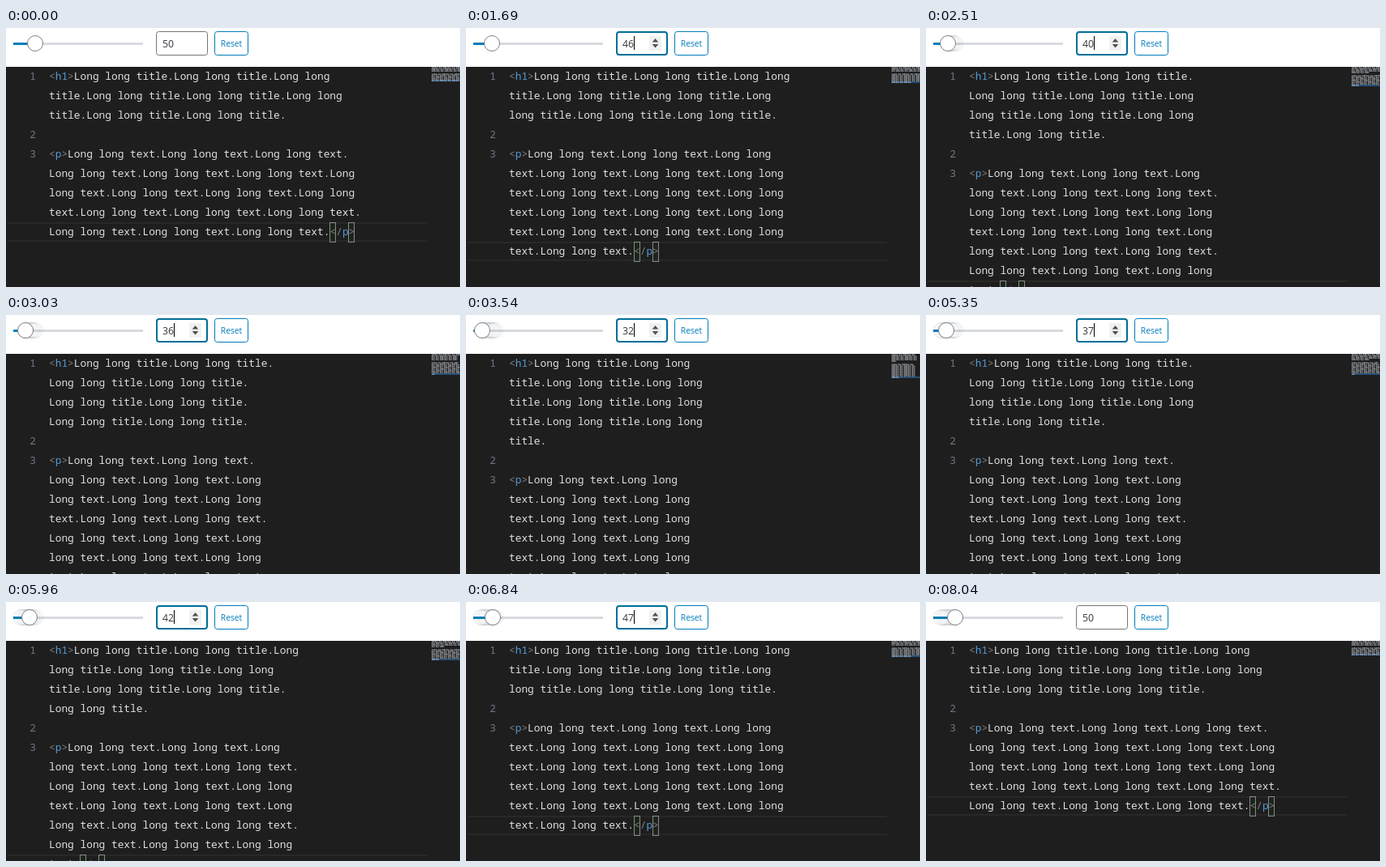
An HTML page with a canvas for the animation above (8.14 s loop, 560x320 px).

```html
<!DOCTYPE html>
<html lang="en">
<head>
<meta charset="utf-8">
<title>Word wrap slider</title>
<style>
  html, body { margin: 0; width: 100%; height: 100%; overflow: hidden; background: #1e1e1e; }
  canvas { display: block; }
</style>
</head>
<body>
<canvas id="stage" width="560" height="320"></canvas>
<script>
const ctx = document.getElementById('stage').getContext('2d');
const LOOP = 8140, MAX = 50, MIN = 30;
const HOVER = 490, FOCUS = 850, CARET_OFF = 7860, BLUR = 8040;
const LEFT = 53, TOP = 48, ROW = 24, CHAR = 7.7, MAP_X = 525;

// Moments at which the wrap column goes down, then up, by one.
const downs = [1280, 1410, 1590, 1690, 1870, 1990, 2100, 2220, 2330, 2480,
               2610, 2710, 2890, 2980, 3080, 3170, 3260, 3410, 3690, 3820];
const ups = [4330, 4500, 4670, 4840, 4990, 5220, 5340, 5470, 5590, 5710,
             5840, 5960, 6090, 6370, 6510, 6710, 6810, 6920, 7020, 7300];

const paragraphs = [
  '<h1>' + 'Long long title.'.repeat(8),
  '',
  '<p>' + 'Long long text.'.repeat(16) + '</p>'
];

const passed = (times, t) => times.filter(time => time <= t).length;

// Breaks after a space or a full stop; a trailing space counts towards the width.
function wrap(text, columns) {
  const lines = [''];
  for (const word of text.match(/[^ .]+[ .]?/g) || []) {
    const last = lines.length - 1;
    if (lines[last].length + word.length > columns) lines.push(word);
    else lines[last] += word;
  }
  return lines;
}

function rect(color, x, y, w, h) {
  ctx.fillStyle = color;
  ctx.fillRect(x, y, w, h);
}

function label(text, x, y, color, font, align = 'left') {
  ctx.fillStyle = color;
  ctx.font = font;
  ctx.textAlign = align;
  ctx.fillText(text, x, y);
}

function frame(x, y, w, h, color, width = 1) {
  ctx.strokeStyle = color;
  ctx.lineWidth = width;
  ctx.beginPath();
  ctx.roundRect(x + width / 2, y + width / 2, w - width, h - width, 3);
  ctx.stroke();
}

function triangle(x, base, tip) {
  ctx.fillStyle = '#505050';
  ctx.beginPath();
  ctx.moveTo(x - 3.8, base);
  ctx.lineTo(x + 3.8, base);
  ctx.lineTo(x, tip);
  ctx.fill();
}

function circle(x, stroke, fill) {
  ctx.beginPath();
  ctx.arc(x, 19, 9.5, 0, Math.PI * 2);
  if (fill) {
    ctx.fillStyle = fill;
    ctx.fill();
  }
  ctx.strokeStyle = stroke;
  ctx.lineWidth = 1;
  ctx.stroke();
}

const thumbX = value => Math.round(8.4 + (value - MIN) * 0.875) + 10;

function drawSlider(value, lowest, t) {
  const x = thumbX(value);
  rect('#d7dade', 9, 18, 160, 3);
  rect('#007cba', 9, 18, x - 9, 3);
  if (t >= 1870) {
    for (let v = lowest; v <= MAX; v += 2) circle(thumbX(v), 'rgba(126,137,147,.16)');
  }
  circle(x, '#7a7f84', '#fff');
}

function drawControls(value, t) {
  const sans = '"Open Sans", "Noto Sans", sans-serif';
  const focused = t >= FOCUS && t < BLUR;
  if (focused) frame(185, 4, 64, 30, '#006e98', 2);
  else frame(185, 4, 64, 30, '#757575');
  label(value, 193, 24, '#32373c', '12.3px ' + sans);
  if (focused && t < CARET_OFF) rect('#000', 207, 10, 1, 17);
  if (t >= HOVER && t < BLUR) {
    rect('#f1f1f1', 226, 10, 15, 18);
    triangle(233.5, 17.5, 13);
    triangle(233.5, 20, 24.5);
  }
  frame(257, 4, 42, 30, '#007cba');
  label('Reset', 278, 23, '#007cba', '10.3px ' + sans, 'center');
}

const codeFont = '12.83px "Noto Sans Mono", "DejaVu Sans Mono", monospace';

function drawCode(line, y) {
  let column = 0;
  for (const part of line.match(/<\/?|>|(?<=<\/?)\w+(?=>)|[^<>]+/g) || []) {
    const color = /[<>]/.test(part) ? '#808080' : /^(h1|p)$/.test(part) ? '#569cd6' : '#e0e0e0';
    label(part, LEFT + column * CHAR, y + 16, color, codeFont);
    column += part.length;
  }
}

function drawBracket(column, y) {
  const x = Math.round(LEFT + column * CHAR - 0.4);
  rect('rgba(0,100,0,.1)', x, y, 8, ROW);
  ctx.strokeStyle = '#888';
  ctx.lineWidth = 1;
  ctx.strokeRect(x + 0.5, y + 0.5, 7, ROW);
}

function drawMinimap(line, y) {
  [...line].forEach((char, i) => {
    if (char === ' ') return;
    const x = MAP_X + i;
    rect(/[A-Zlhtx]/.test(char) ? 'rgba(200,208,216,.55)' : 'rgba(200,208,216,.25)', x, y, 1, 1);
    rect(char === '.' ? 'rgba(200,208,216,.2)' : 'rgba(200,208,216,.48)', x, y + 1, 1, 1);
  });
}

function drawEditor(columns) {
  let row = 0;
  paragraphs.forEach((text, index) => {
    label(index + 1, 33, TOP + row * ROW + 16, '#6f7684', codeFont, 'center');
    const lines = wrap(text, columns);
    lines.forEach((line, i) => {
      const y = TOP + row * ROW, mapY = TOP + row * 2;
      if (index === 2 && i === lines.length - 1) {
        rect('#282828', 2, y, 517, 2);
        rect('#282828', 2, y + ROW - 2, 517, 2);
        rect('#264f78', MAP_X, mapY, 35, 2);
        drawBracket(line.length - 4, y);
        drawBracket(line.length - 1, y);
      }
      drawCode(line, y);
      drawMinimap(line, mapY);
      row++;
    });
  });
}

function draw(now) {
  const t = now % LOOP;
  const lowest = MAX - passed(downs, t);
  const value = lowest + passed(ups, t);
  rect('#1e1e1e', 0, 0, 560, 320);
  rect('#fff', 0, 0, 560, TOP);
  drawSlider(value, lowest, t);
  drawControls(value, t);
  drawEditor(value);
}

const start = performance.now();
function tick() {
  draw(performance.now() - start);
  requestAnimationFrame(tick);
}
tick();
</script>
</body>
</html>
```
